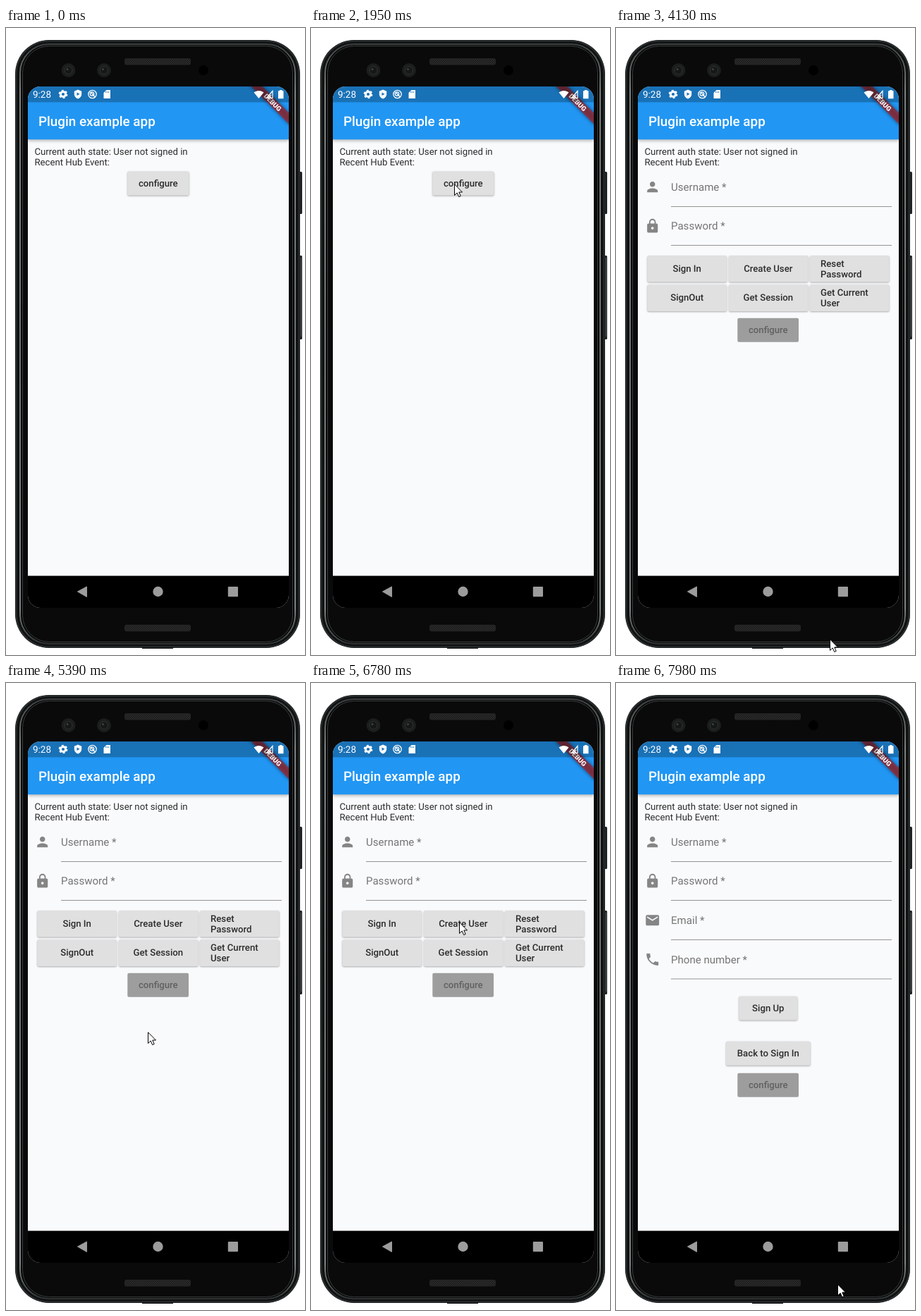
Write an HTML page that moves like this. It is 424 px wide and 890 px high and loops after 8000 ms.

```html
<!DOCTYPE html>
<html lang="en">
<head>
<meta charset="utf-8">
<title>Plugin example app</title>
<style>
  html, body { margin: 0; width: 100%; height: 100%; overflow: hidden; background: #fff; }
  svg { display: block; }
  text { font: 13.19px Roboto, sans-serif; fill: #2c2c2c; white-space: pre; text-rendering: geometricPrecision; }
  .title { font-size: 18.84px; font-weight: 500; fill: #fff; }
  .clock { font-size: 13.5px; fill: #fff; }
  .debug { font-size: 9.6px; font-weight: 900; fill: #fff; text-anchor: middle; }
  .label { font-size: 15.07px; fill: #757575; }
  .btn { font-weight: 500; text-anchor: middle; }
  .left { text-anchor: start; }
  .off { fill: #616161; }
  .raised { fill: #e0e0e0; filter: drop-shadow(0 1px 1px rgba(0,0,0,.32)); }
  .flat { fill: #9d9d9d; }
  .bar { fill: #2196f3; filter: drop-shadow(0 2px 2px rgba(0,0,0,.28)); }
  .icon { fill: #858585; }
  .rule { stroke: #949494; stroke-width: 1; }
  .shade { filter: blur(2.5px); opacity: .5; }

  .view, .form, .tap, .move-x, .move-y { animation: 8s infinite; }
  .view, .form, .tap { animation-timing-function: step-end; }
  .move-x, .move-y { animation-timing-function: ease-in-out; }
  .start { animation-name: start; }
  .form { animation-name: form; }
  .login { animation-name: login; }
  .signup { animation-name: signup; }
  .tap { animation-name: tap; }
  .move-x { animation-name: move-x; }
  .move-y { animation-name: move-y; }

  @keyframes start { 0% { visibility: visible } 30.87%, 100% { visibility: hidden } }
  @keyframes form { 0% { visibility: hidden } 30.87%, 100% { visibility: visible } }
  @keyframes login { 0% { visibility: hidden } 30.87% { visibility: visible } 86.62%, 100% { visibility: hidden } }
  @keyframes signup { 0% { visibility: hidden } 86.62%, 100% { visibility: visible } }
  @keyframes tap {
    0%, 24.36%, 84.74%, 100% { visibility: hidden }
    22.75%, 83.125% { visibility: visible }
  }
  @keyframes move-x {
    0%, 3.875% { transform: translateX(322px) }
    10%, 12.875% { transform: translateX(203px) }
    15.75% { transform: translateX(242px) }
    18.625%, 30.875% { transform: translateX(203px) }
    38.25%, 39.875% { transform: translateX(236px) }
    40.75%, 41% { transform: translateX(215px) }
    42.75% { transform: translateX(152px) }
    45.875%, 48.875% { transform: translateX(290px) }
    51.6%, 52.25% { transform: translateX(303px) }
    55.125% { transform: translateX(324px) }
    61.625% { transform: translateX(333px) }
    67%, 68.7% { transform: translateX(201px) }
    71.5%, 71.75% { transform: translateX(120px) }
    73% { transform: translateX(114px) }
    77.5%, 81.875% { transform: translateX(163px) }
    83%, 88.625% { transform: translateX(210px) }
    91% { transform: translateX(132px) }
    95.25%, 97.25% { transform: translateX(251px) }
    99.7%, 100% { transform: translateX(314px) }
  }
  @keyframes move-y {
    0%, 3.875% { transform: translateY(891px) }
    10%, 12.875% { transform: translateY(394px) }
    18.625%, 30.875% { transform: translateY(221px) }
    38.25%, 39.875% { transform: translateY(272px) }
    40.75%, 41% { transform: translateY(248px) }
    45.875%, 48.875% { transform: translateY(744px) }
    51.6%, 52.25% { transform: translateY(867px) }
    55.125%, 61.625% { transform: translateY(891px) }
    67%, 68.7% { transform: translateY(495px) }
    71.5%, 71.75% { transform: translateY(433px) }
    77.5%, 81.875% { transform: translateY(348px) }
    83%, 88.625% { transform: translateY(339px) }
    95.25%, 97.25% { transform: translateY(770px) }
    99.7%, 100% { transform: translateY(853px) }
  }
</style>
</head>
<body>
<svg width="424" height="890" viewBox="0 0 424 890">
  <defs>
    <clipPath id="screen"><rect x="31" y="83" width="370" height="740" rx="18"/></clipPath>
    <pattern id="mesh" width="3" height="3" patternUnits="userSpaceOnUse">
      <rect width="3" height="3" fill="#171717"/>
      <path d="M0 0h1.5v1.5H0zM1.5 1.5H3V3H1.5z" fill="#303030"/>
    </pattern>
    <linearGradient id="rim" x2="0" y2="1">
      <stop offset="0" stop-color="#3c4040"/>
      <stop offset=".08" stop-color="#8c9090"/>
      <stop offset=".5" stop-color="#7c8080"/>
      <stop offset=".94" stop-color="#8c9090"/>
      <stop offset="1" stop-color="#303333"/>
    </linearGradient>
    <rect id="wide" width="112.5" height="37.6" rx="2"/>
    <path id="line" class="rule" d="M78 0H391"/>
  </defs>

  <!-- phone body -->
  <rect x="414" y="204" width="6" height="60" rx="1.5" fill="#222525"/>
  <rect x="414" y="323" width="6" height="119" rx="1.5" fill="#222525"/>
  <path d="M418.5 326V438" stroke="#5a5e5e"/>
  <rect x="193" y="879" width="44" height="2" fill="#111"/>
  <rect x="13" y="17" width="404" height="863" rx="48" fill="#101212"/>
  <rect x="14.5" y="18.5" width="401" height="860" rx="46.5" fill="none" stroke="#2b2f2f" stroke-width="2"/>
  <rect x="20" y="23" width="390" height="851" rx="41" fill="#050505" stroke="url(#rim)" stroke-width="1.8"/>
  <rect x="23.5" y="25.5" width="383" height="846" rx="38" fill="#0a0a0a" stroke="#3c3f3f"/>
  <g fill="url(#mesh)">
    <rect x="168" y="43" width="94" height="9.5" rx="3"/>
    <rect x="168" y="847" width="94" height="9.5" rx="3"/>
  </g>
  <g fill="#1c1d1d">
    <circle cx="88.5" cy="60" r="10"/><circle cx="139" cy="60" r="10"/>
  </g>
  <g fill="#161717" stroke="#303232">
    <circle cx="88.5" cy="60" r="5.5"/><circle cx="139" cy="60" r="5.5"/>
  </g>
  <g fill="#3d4141">
    <circle cx="87" cy="58.5" r="1.5"/><circle cx="137.5" cy="58.5" r="1.5"/>
  </g>
  <circle cx="280" cy="60" r="7" fill="#000"/>

  <g clip-path="url(#screen)">
    <rect x="31" y="83" width="370" height="740" fill="#f9fafc"/>
    <rect class="bar" x="31" y="83" width="370" height="75.2"/>
    <text class="title" x="46" y="138.7">Plugin example app</text>
    <g transform="translate(401 83) rotate(45)">
      <rect class="shade" x="-40" y="26.4" width="80" height="11.3"/>
      <rect x="-40" y="26.4" width="80" height="11.3" fill="#b71c1c" fill-opacity=".63"/>
      <text class="debug" y="35.5">DEBUG</text>
    </g>
    <rect x="31" y="83" width="370" height="22.4" fill="#000" opacity=".25"/>

    <!-- status icons -->
    <text class="clock" x="38" y="99">9:28</text>
    <g fill="none" stroke="#fff">
      <circle cx="81" cy="94" r="3.6" stroke-width="3"/>
      <circle cx="81" cy="94" r="5.5" stroke-width="1.7" stroke-dasharray="2.9 2.86"/>
      <circle cx="122.5" cy="94" r="5.7" stroke-width="1.3"/>
      <circle cx="122" cy="93.5" r="2.7" stroke-width="1.3"/>
      <path d="M120 91L126.5 98" stroke-width="1.4"/>
      <path d="M369.5 99.5H378V89.5Z" stroke-width="1.2"/>
      <path d="M372 95l4 4m0-4l-4 4" stroke-width="1.2"/>
    </g>
    <g fill="#fff">
      <path d="M102 87.5l5.2 2.2v4c0 3-2.2 5.7-5.2 6.7c-3-1-5.2-3.7-5.2-6.7v-4z"/>
      <path d="M142.5 88h5.5v12h-9.5v-8z"/>
      <path d="M351.5 91.5c4-3.4 10-3.4 14 0L358.5 100z"/>
      <path d="M388 88h3.5v1.3h2V100.3h-7.5V89.3h2z"/>
    </g>
    <path d="M100.5 91.5l4 2.3l-4 2.3z" fill="#1970b6"/>
    <path d="M141.5 90v2m2-2v2m2-2v2" stroke="#1970b6" stroke-width=".8"/>

    <text x="40.4" y="180">Current auth state: User not signed in</text>
    <text x="40.4" y="195.3">Recent Hub Event:</text>

    <g class="view start">
      <rect class="raised" x="172.3" y="203.5" width="87.2" height="33.9" rx="2"/>
      <text class="btn" x="215.8" y="225">configure</text>
    </g>

    <g class="form">
      <path class="icon" transform="translate(40.4 214.3) scale(.942)" d="M12 12c2.21 0 4-1.79 4-4s-1.79-4-4-4-4 1.79-4 4 1.79 4 4 4zm0 2c-2.67 0-8 1.34-8 4v2h16v-2c0-2.66-5.33-4-8-4z"/>
      <text class="label" x="78" y="230.5">Username *</text>
      <use href="#line" y="253.5"/>
      <path class="icon" transform="translate(40.4 269.9) scale(.942)" d="M18 8h-1V6c0-2.76-2.24-5-5-5S7 3.24 7 6v2H6c-1.1 0-2 .9-2 2v10c0 1.1.9 2 2 2h12c1.1 0 2-.9 2-2V10c0-1.1-.9-2-2-2zm-6 9c-1.1 0-2-.9-2-2s.9-2 2-2 2 .9 2 2-.9 2-2 2zm3.1-9H8.9V6c0-1.71 1.39-3.1 3.1-3.1s3.1 1.39 3.1 3.1z"/>
      <text class="label" x="78" y="286.2">Password *</text>
      <use href="#line" y="308.5"/>
    </g>

    <g class="view login">
      <g class="raised">
        <use href="#wide" x="44.5" y="323"/><use href="#wide" x="160" y="323"/><use href="#wide" x="275" y="323"/>
        <use href="#wide" x="44.5" y="364.3"/><use href="#wide" x="160" y="364.3"/><use href="#wide" x="275" y="364.3"/>
      </g>
      <text class="btn" x="100.7" y="346">Sign In</text>
      <text class="btn" x="215.8" y="346">Create User</text>
      <text class="btn left" x="290" y="338.7">Reset</text>
      <text class="btn left" x="290" y="354">Password</text>
      <text class="btn" x="100.7" y="387.3">SignOut</text>
      <text class="btn" x="215.8" y="387.3">Get Session</text>
      <text class="btn left" x="290" y="380">Get Current</text>
      <text class="btn left" x="290" y="395">User</text>
      <rect class="flat" x="172.3" y="411.8" width="86.7" height="33.9" rx="2"/>
      <text class="btn off" x="215.8" y="433.3">configure</text>
    </g>

    <g class="view signup">
      <path class="icon" transform="translate(40.4 325.5) scale(.942)" d="M20 4H4c-1.1 0-2 .9-2 2v12c0 1.1.9 2 2 2h16c1.1 0 2-.9 2-2V6c0-1.1-.9-2-2-2zm0 4l-8 5-8-5V6l8 5 8-5z"/>
      <text class="label" x="78" y="341.8">Email *</text>
      <use href="#line" y="364.5"/>
      <path class="icon" transform="translate(40.4 381.1) scale(.942)" d="M6.62 10.79c1.44 2.83 3.76 5.14 6.59 6.59l2.2-2.2c.27-.27.67-.36 1.02-.24 1.12.37 2.33.57 3.57.57.55 0 1 .45 1 1V20c0 .55-.45 1-1 1-9.39 0-17-7.61-17-17 0-.55.45-1 1-1h3.5c.55 0 1 .45 1 1 0 1.25.2 2.45.57 3.57.11.35.03.74-.25 1.02z"/>
      <text class="label" x="78" y="397.5">Phone number *</text>
      <use href="#line" y="420"/>
      <rect class="raised" x="174.3" y="444.7" width="83" height="33.9" rx="2"/>
      <text class="btn" x="215.8" y="466.2">Sign Up</text>
      <rect class="raised" x="156" y="508.8" width="119.6" height="33.9" rx="2"/>
      <text class="btn" x="215.8" y="530.3">Back to Sign In</text>
      <rect class="flat" x="172.3" y="553.8" width="86.7" height="33.9" rx="2"/>
      <text class="btn off" x="215.8" y="575.3">configure</text>
    </g>

    <!-- navigation bar -->
    <rect x="31" y="777.6" width="370" height="45.4" fill="#000"/>
    <g fill="#9c9c9c">
      <path d="M101.5 800L114.5 793V807.5Z" stroke="#9c9c9c" stroke-linejoin="round"/>
      <circle cx="215.5" cy="800" r="7.2"/>
      <rect x="314.8" y="793" width="14.2" height="14.2" rx="1"/>
    </g>
  </g>

  <g class="move-x">
    <g class="move-y">
      <circle class="tap" r="12" fill="#ff0" fill-opacity=".47"/>
      <path d="M.5.8V16.5L4.2 13L6.7 18.6L9.2 17.5L6.8 12H11.5Z" fill="#fff" stroke="#000"/>
    </g>
  </g>
</svg>
</body>
</html>
```
